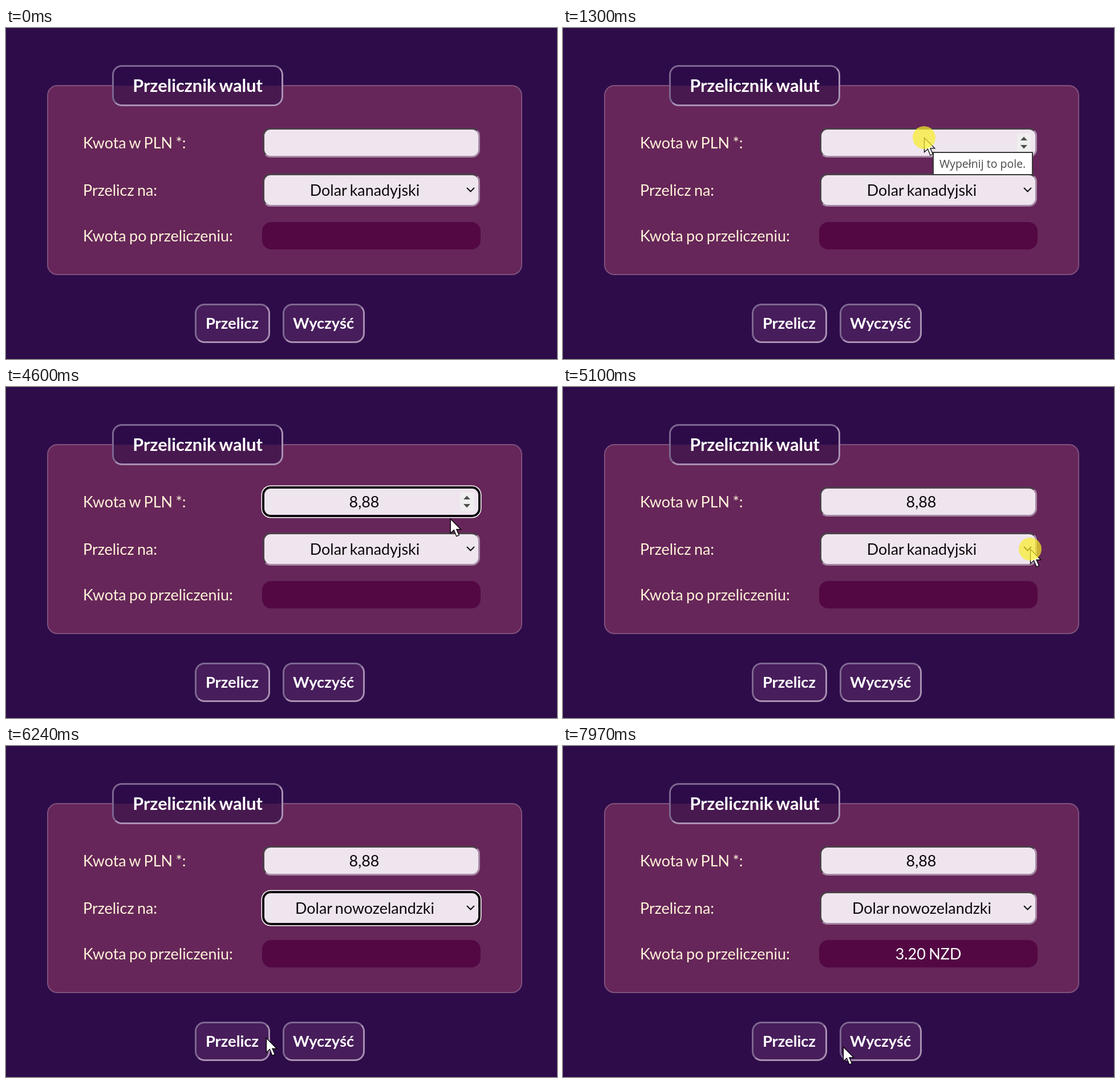
These frames come from a looping animation (966 px wide and 580 px high, 8 s). An HTML page:

```html
<!DOCTYPE html>
<html lang="pl">
<head>
<meta charset="utf-8">
<title>Przelicznik walut</title>
<style>
html, body { margin: 0; width: 100%; height: 100%; overflow: hidden; background: #2e0c4a; }
div, svg { position: absolute; box-sizing: border-box; }
svg { left: 0; top: 0; overflow: visible; }
[hidden] { display: none; }
.text { font: 26.9px/0 Lato, sans-serif; word-spacing: -.055em; white-space: pre; color: #0e080d; }
.mid { transform: translateX(-50%); }
.label { color: #fff2d9; }
.bold { font-weight: bold; font-size: 27.3px; color: #fff; }
.title { font-size: 30.7px; }
.white { color: #fff; }
.panel { background: #662659; border: 2px solid #80507c; border-radius: 18px; }
.legend, .button { border: 3px solid; border-color: #7d6790 #a890b1 #a890b1 #7d6790; border-radius: 17px; }
.legend { background: linear-gradient(#2d0b49 33px, #47194f 33px); }
.button { background: #471d5b; }
.hover { background: #52286a; }
.field { background: #efe5ee; border: 3px solid; border-color: #4b3f4a #a486a3 #a486a3 #4b3f4a; border-radius: 14px; }
.focus { border-color: #0d070c; box-shadow: 0 0 0 1px #0d070c, 0 0 0 2.5px #fff; }
.output { background: #530843; border-radius: 16px; }
.caret { background: #111; }
.tip { background: #fff; border: 2px solid #383838; }
.tipText { font: 19.5px/0 "Open Sans", "Noto Sans", sans-serif; word-spacing: 0; color: #484848; }
.list { background: #f0e6ee; border: 1px solid #5a4a58; }
.mark { background: #1e90ff; }
.click { background: rgba(250, 238, 40, .7); border-radius: 50%; }
</style>
</head>
<body>
<script>
const LOOP = 8000, MID = 628, ROW = 33.36;
const options = ['Dolar kanadyjski', 'Dolar nowozelandzki', 'Frank szwajcarski',
  'Korona islandzka', 'Korona norweska', 'Jen', 'Won południowokoreański'];

function add(cls, x, y, parent = document.body) {
  const el = document.createElement('div');
  el.className = cls;
  el.style.left = x + 'px';
  el.style.top = y + 'px';
  return parent.appendChild(el);
}
function box(cls, x, y, w, h, parent) {
  const el = add(cls, x, y, parent);
  el.style.width = w + 'px';
  el.style.height = h + 'px';
  return el;
}
function text(cls, x, y, value, parent) {
  const el = add('text ' + cls, x, y, parent);
  el.textContent = value;
  return el;
}
function drawing(shapes) {
  document.body.insertAdjacentHTML('beforeend', `<svg width="1" height="1">${shapes}</svg>`);
  return document.body.lastElementChild;
}

// Form
box('panel', 72, 100, 833, 333);
box('legend', 186, 65, 300, 72);
text('mid bold title', 336, 101, 'Przelicznik walut');
[['Kwota w PLN *:', 201], ['Przelicz na:', 284], ['Kwota po przeliczeniu:', 363.5]]
  .forEach(([value, y]) => text('label', 135, y, value));
const amount = box('field', 450, 175, 381, 52);
const amountText = text('mid', MID, 201, '');
const caret = box('caret', MID, 187, 2, 28);
const choice = box('field', 450, 255, 381, 58);
const choiceText = text('mid', MID + 1, 284, '');
box('output', 449, 340, 383, 48);
const result = text('mid white', 640.5, 363.5, '3.20 NZD');
const convert = box('button', 331, 483, 132, 69);
text('mid bold', 396.5, 516.5, 'Przelicz');
box('button', 485, 483, 144, 69);
text('mid bold', 556.5, 516.5, 'Wyczyść');
drawing('<path d="M808 280l6.5 6.500 6.500-6.500" fill="none" stroke="#111" stroke-width="2"/>');
const spinner = drawing('<path d="M796 185h24v32h-24z" fill="#efefef"/>' +
  '<path d="M802 197l6-6.500 6 6.500zM802 205l6 6.500 6-6.500z" fill="#505050"/>');

// Overlays
const tip = add('', 0, 0);
box('tip', 648, 217, 176, 41, tip);
text('tipText', 660, 238, 'Wypełnij to pole.', tip);
const menu = add('', 0, 0);
box('list', 448, 314, 383, 234, menu);
const mark = box('mark', 449, 0, 381, ROW, menu);
const rows = options.map((name, i) => text('mid', 646.5, 331 + i * ROW, name, menu));
const cursor = drawing('<path d="M.5.500V25.500L6.500 20 11 31 15.500 29 11 18.800H18.700Z" ' +
  'fill="#fff" stroke="#000" stroke-width="1.300"/>');
const click = box('click', 0, 0, 40, 40);

// Pointer stops: time, x, y
const path = [
  [380, 845, 578], [620, 710, 375], [850, 657, 262], [1180, 633, 192],
  [1830, 633, 192], [2040, 610, 114], [4420, 610, 114], [4490, 638, 101],
  [4600, 778, 230], [4740, 837, 276], [4930, 819, 284], [5530, 819, 284],
  [5840, 791.5, 347], [5920, 785, 361], [6010, 785, 361], [6130, 657, 408],
  [6270, 438, 521], [6780, 438, 521], [6960, 449, 515], [7110, 411, 531],
  [7850, 411, 531], [7970, 491, 527], [LOOP, 491, 527]
];

// Velocity at a stop; zero next to a rest
function slope(i, k) {
  const a = path[Math.max(i - 1, 0)], p = path[i], b = path[Math.min(i + 1, path.length - 1)];
  const rests = q => q !== p && q[1] === p[1] && q[2] === p[2];
  return rests(a) || rests(b) ? 0 : (b[k] - a[k]) / (b[0] - a[0]);
}
function pointer(t) {
  const i = Math.max(0, path.findIndex(p => p[0] > t) - 1);
  const a = path[i], b = path[i + 1], d = b[0] - a[0];
  const u = Math.max(0, (t - a[0]) / d), v = 1 - u;
  return [1, 2].map(k => v * v * (1 + 2 * u) * a[k] + u * u * (3 - 2 * u) * b[k] +
    d * u * v * (v * slope(i, k) - u * slope(i + 1, k)));
}

const keys = [[2840, '8'], [3220, '8,'], [3620, '8,8'], [3750, '8,88']];

function draw(t) {
  const during = (from, to) => t >= from && t < to;
  const show = (el, on) => el.toggleAttribute('hidden', !on);
  const typed = keys.filter(([at]) => t >= at).pop() || [1330, ''];
  const editing = during(1330, 5100);

  amountText.textContent = typed[1];
  amount.classList.toggle('focus', editing);
  show(caret, editing && (t - typed[0]) % 1010 < 505);
  caret.style.left = MID - 1 + amountText.getBoundingClientRect().width / 2 + 'px';
  show(spinner, during(1300, 5100));
  show(tip, during(1300, 1330));

  choiceText.textContent = options[t < 6010 ? 0 : 1];
  choice.classList.toggle('focus', during(6010, 7190));
  show(menu, during(5170, 6010));
  const active = t < 5870 ? 0 : 1;
  mark.style.top = 314.6 + active * ROW + 'px';
  rows.forEach((row, i) => row.classList.toggle('white', i === active));

  convert.classList.toggle('hover', during(7000, 7880));
  show(result, t >= 7260);

  const [x, y] = pointer(t);
  show(cursor, t >= 380);
  cursor.style.transform = `translate(${x}px, ${y}px)`;
  show(click, during(1300, 1440) || during(5100, 5170) || during(5940, 6010) || during(7190, 7290));
  click.style.transform = `translate(${x - 20}px, ${y - 20}px)`;
}

const start = performance.now();
function tick() {
  draw((performance.now() - start) % LOOP);
  requestAnimationFrame(tick);
}
tick();
</script>
</body>
</html>
```
